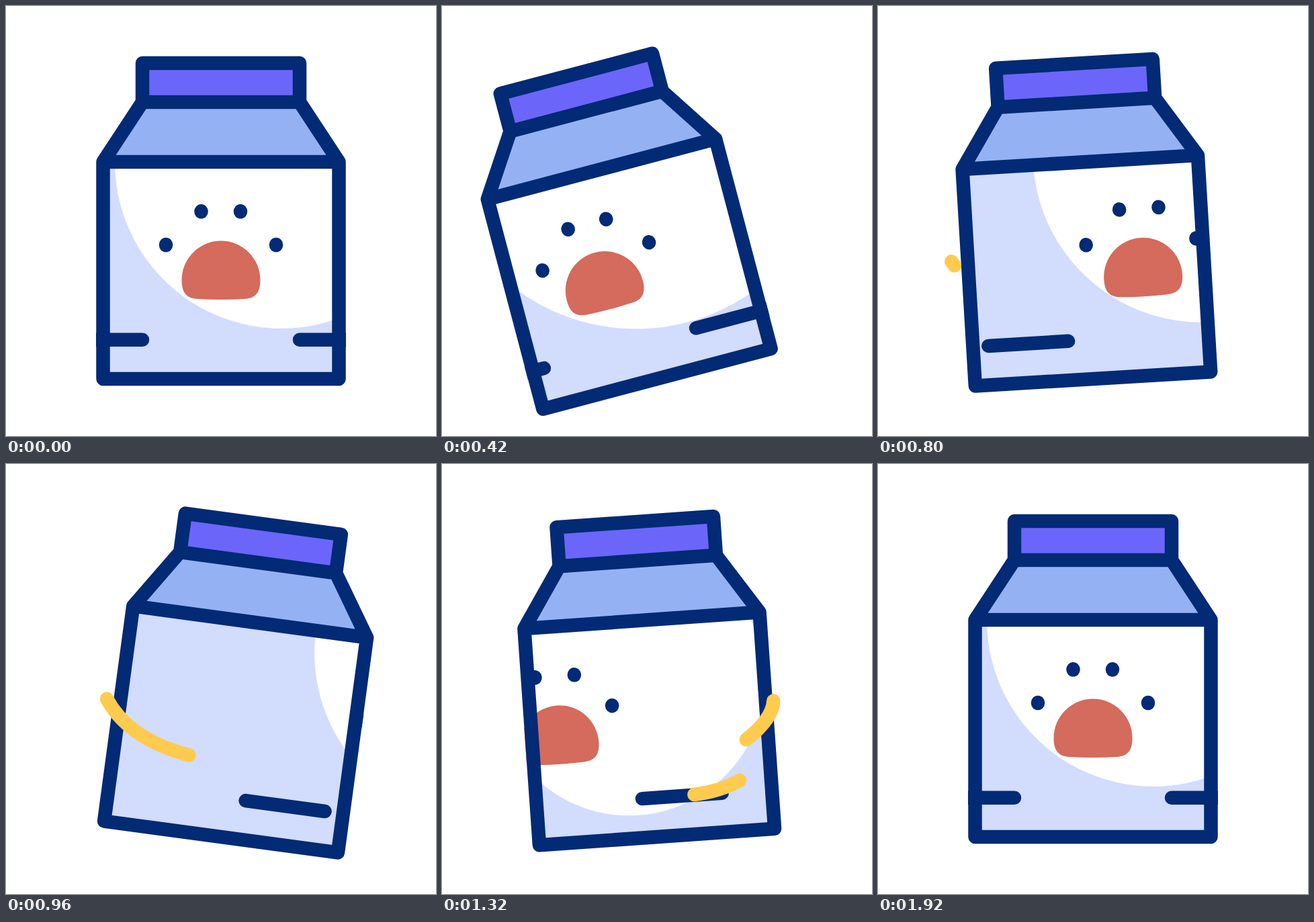
An HTML page for the animation above (2.4 s loop, 640 by 640 pixels).

```html
<!DOCTYPE html>
<html lang="en">
<head>
<meta charset="utf-8">
<title>Milk carton</title>
<style>
  html, body { margin: 0; width: 100%; height: 100%; overflow: hidden; background: #fff; }
  svg { display: block; width: 100%; height: 100%; }
  .line { fill: none; stroke: #032a75; stroke-width: 20.5; stroke-linecap: round; stroke-linejoin: round; }
  .swoosh { fill: none; stroke: #ffcb4f; stroke-width: 20.5; stroke-linecap: round; }
  .dots { fill: #032a75; }
</style>
</head>
<body>
<svg viewBox="0 0 640 640">
  <defs>
    <clipPath id="body"><rect x="144.5" y="232" width="351" height="323"/></clipPath>
    <clipPath id="label"><rect x="134" y="232" width="372" height="323"/></clipPath>
  </defs>
  <g id="carton">
    <rect x="144.5" y="232" width="351" height="323" fill="#d2dcfd"/>
    <g clip-path="url(#body)"><circle id="milk" fill="#fff"/></g>
    <g clip-path="url(#label)">
      <g id="face">
        <path fill="#d46b5c" d="M261.5 408A58.5 58.5 0 0 1 378.5 408C378.5 427 371 435 355 436Q320 438 285 436C269 435 261.5 427 261.5 408Z"/>
        <g class="dots">
          <ellipse cx="290.5" cy="305.8" rx="10.3" ry="10.8"/>
          <ellipse cx="349" cy="305.8" rx="10.3" ry="10.8"/>
          <ellipse cx="238" cy="355.5" rx="10.3" ry="10.8"/>
          <ellipse cx="402" cy="355.5" rx="10.3" ry="10.8"/>
        </g>
        <path class="line" d="M84 496.7H203M437 496.7H556"/>
      </g>
    </g>
    <path d="M203 143H437L495.5 232H144.5Z" fill="#94b2f3"/>
    <rect x="203" y="85" width="234" height="58" fill="#6b66f9"/>
    <path class="line" d="M203 143V85H437V143ZL144.5 232V555H495.5V232L437 143M144.5 232H495.5"/>
    <path id="upper" class="swoosh" d="M120 368C150 415 205 435 259 441C340 450 420 446 456 424C485 406 505 385 507 365"/>
  </g>
  <path id="lower" class="swoosh" d="M260 490C295 496 335 496 375 492C400 489 425 481 443 471Q453 464 461 452"/>
</svg>
<script>
const LOOP = 2400;
const LAP = 861;          // distance the print travels in one turn
const WINDUP = 49;
const byId = id => document.getElementById(id);
const carton = byId('carton'), face = byId('face'), milk = byId('milk');
const clamp = v => Math.min(1, Math.max(0, v));
const smooth = p => p * p * (3 - 2 * p);
const ease = (t, from, to) => smooth(clamp((t - from) / (to - from)));

// Each key is [time, ...values]
const swing = [[0, 0], [577, -18.05], [992, 8.1], [1320, -4], [1610, 2.1], [1920, 0]];
const milkKeys = [
  [0, 410, 232, 248], [420, 427, 185, 300], [660, 431, 228, 254], [960, 402, 232, 248],
  [1080, 402, 232, 248], [1110, 430, 319, 202], [1320, 430, 319, 202], [1520, 410, 232, 248]
];

function sample(keys, t) {
  const next = keys.findIndex(key => key[0] > t);
  if (next < 0) return keys[keys.length - 1].slice(1);
  const a = keys[next - 1], b = keys[next], k = ease(t, a[0], b[0]);
  return a.slice(1).map((v, i) => v + (b[i + 1] - v) * k);
}

// Ease-in-out whose time handles sit at x1 and x2
function bezierEase(p, x1, x2) {
  let lo = 0, hi = 1;
  for (let i = 0; i < 24; i++) {
    const m = (lo + hi) / 2, n = 1 - m;
    if (3 * n * n * m * x1 + 3 * n * m * m * x2 + m * m * m < p) lo = m;
    else hi = m;
  }
  return smooth(lo);
}

function slide(t) {
  if (t < 559) return -WINDUP * ease(t, 0, 559);
  const x = (LAP + WINDUP) * bezierEase(clamp((t - 559) / 971), 1 / 3, 0.733) - WINDUP;
  return x > LAP / 2 ? x - LAP : x;
}

function swoosh(id, headFrom, headTo, tailFrom, tailTo) {
  const path = byId(id), length = path.getTotalLength();
  return t => {
    const head = ease(t, headFrom, headTo), tail = ease(t, tailFrom, tailTo);
    const visible = head > tail && tail < 1;
    path.style.display = visible ? '' : 'none';
    if (!visible) return;
    path.setAttribute('stroke-dasharray', `${(head - tail) * length} ${length * 2}`);
    path.setAttribute('stroke-dashoffset', -tail * length);
  };
}

const swooshes = [
  swoosh('upper', 763, 1250, 920, 1460),
  swoosh('lower', 985, 1415, 1013, 1596)
];

function draw(t) {
  const x = slide(t);
  const [cx, cy, r] = sample(milkKeys, t);
  carton.setAttribute('transform', `rotate(${sample(swing, t)[0]} 320 555)`);
  face.setAttribute('transform', `translate(${x} 0)`);
  milk.setAttribute('cx', cx + x);
  milk.setAttribute('cy', cy);
  milk.setAttribute('r', r);
  swooshes.forEach(update => update(t));
}

const start = performance.now();
function frame() {
  draw((performance.now() - start) % LOOP);
  requestAnimationFrame(frame);
}
frame();
</script>
</body>
</html>
```
